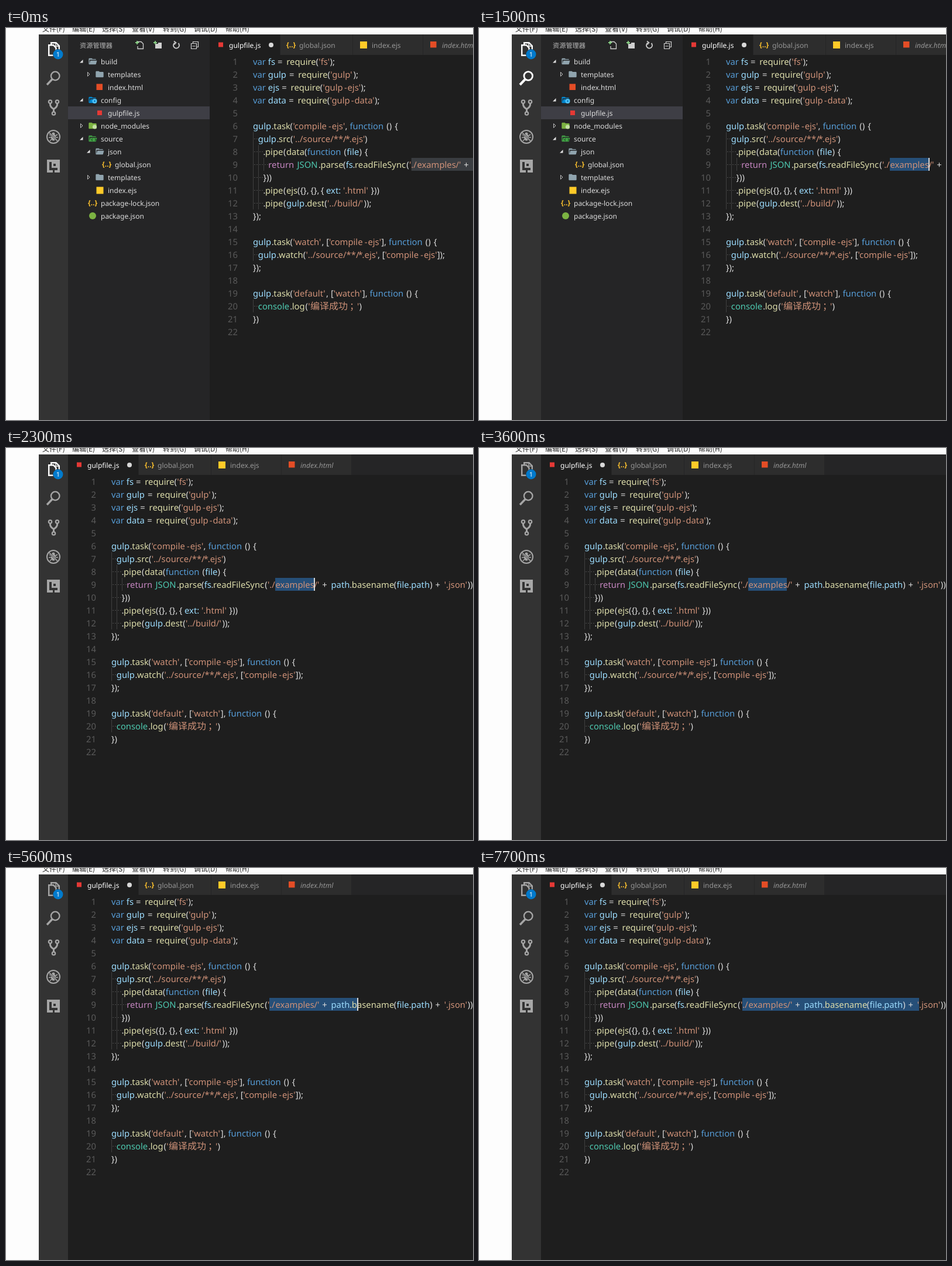
An HTML page with a canvas that plays this animation: 798 by 670 pixels, repeating every 8000 ms.

```html
<!DOCTYPE html>
<html lang="en">
<head>
<meta charset="utf-8">
<title>Editor</title>
<style>
html, body { margin: 0; width: 100%; height: 100%; overflow: hidden; background: #1e1e1e; }
canvas { display: block; }
</style>
</head>
<body>
<canvas id="stage" width="798" height="670"></canvas>
<script>
const ctx = document.getElementById('stage').getContext('2d');
const LOOP = 8000;
const ROW = 22, TOP = 46;
const LATIN = '"Noto Sans", "Open Sans", sans-serif';
const CJK = '"Noto Sans CJK SC", "Noto Sans CJK", sans-serif';
const CODE_FONT = '14.8px ' + LATIN;
const UI_FONT = '12px ' + LATIN;

const SYNTAX = {
  k: '#569cd6', v: '#9cdcfe', f: '#dcdcaa', p: '#dcdcdc',
  s: '#ce9178', c: '#c586c0', t: '#4ec9b0', z: '#ce9178'
};

// Each token is kind:offset:text, the offset counted from the code's left edge.
const CODE = [
  "k:0:var v:25.8:fs p:42:= f:57.3:require p:107.5:( s:112.3:'fs' p:131.5:);",
  "k:0:var v:25.8:gulp p:62:= f:77.3:require p:127.5:( s:132.3:'gulp' p:171.5:);",
  "k:0:var v:25.8:ejs p:49.3:= f:64.6:require p:114.8:( s:119.6:'gulp s:155.9:- s:161.5:ejs' p:184.3:);",
  "k:0:var v:25.8:data p:61.2:= f:76.5:require p:126.7:( s:131.5:'gulp s:167.8:- s:173.4:data' p:208.1:);",
  "",
  "v:0:gulp p:31.8:. f:35.3:task p:63.6:( s:68.4:'compile s:129.1:- s:134.7:ejs' p:157.5:, k:165.4:function p:228.2:() p:242.2:{",
  "v:8.8:gulp p:40.6:. f:44.1:src p:63.9:( s:68.7:'../ s:85.6:source s:132.3:/**/ s:157.8:* s:164.8:.ejs' p:191.1:)",
  "p:17.5:. f:21:pipe p:52.1:( f:56.9:data p:87.9:( k:92.7:function p:155.5:( v:160.3:file p:181.5:) p:190.7:{",
  "c:26.3:return t:75.5:JSON p:112.1:. f:115.6:parse p:153.9:( v:158.7:fs p:170.5:. f:174:readFileSync p:262.2:( s:267:'./ s:280.4:examples s:346.4:/' p:360.3:+ v:375.5:path p:407.3:. f:410.8:basename p:482.8:( v:487.6:file p:508.7:. v:512.2:path p:544.2:) p:553.4:+ s:568.7:'.json' p:608.8:))",
  "p:17.5:}))",
  "p:17.5:. f:21:pipe p:52.1:( f:56.9:ejs p:76:({}, p:98.3:{}, p:115.8:{ v:125:ext: s:154:'.html' p:201.5:}))",
  "p:17.5:. f:21:pipe p:52.1:( v:56.9:gulp p:88.7:. f:92.2:dest p:122.2:( s:127:'../ s:143.9:build/' p:189.5:));",
  "p:0:});",
  "",
  "v:0:gulp p:31.8:. f:35.3:task p:63.6:( s:68.4:'watch' p:117.4:, p:125.3:[ s:130.1:'compile s:190.8:- s:196.4:ejs' p:219.2:], k:231.9:function p:294.7:() p:308.7:{",
  "v:8.8:gulp p:40.6:. f:44.1:watch p:85.7:( s:90.5:'../ s:107.4:source s:154.1:/**/ s:179.6:* s:186.6:.ejs' p:212.9:, p:220.8:[ s:225.6:'compile s:286.3:- s:291.9:ejs' p:314.7:]);",
  "p:0:});",
  "",
  "v:0:gulp p:31.8:. f:35.3:task p:63.6:( s:68.4:'default' p:125.1:, p:133:[ s:137.8:'watch' p:186.8:], k:199.5:function p:262.3:() p:276.3:{",
  "t:8.8:console p:63.2:. f:66.7:log p:89.4:( s:94.2:' z:97.9:编译成功 z:165:； s:177.9:' p:181.6:)",
  "p:0:})",
  ""
].map(line => line.split(' ').filter(Boolean).map(token => {
  const [, kind, x, text] = token.match(/^(\w):([\d.]+):(.*)$/);
  return { kind, x: +x, text };
}));

// Label, icon, icon x, disclosure arrow (1 open, 0 closed).
const TREE = [
  ['build', 'open', 140, 1],
  ['templates', 'folder', 152, 0],
  ['index.html', 'html', 152],
  ['config', 'config', 140, 1],
  ['gulpfile.js', 'task', 152],
  ['node_modules', 'modules', 140, 0],
  ['source', 'source', 140, 1],
  ['json', 'open', 152, 1],
  ['global.json', 'json', 164],
  ['templates', 'folder', 152, 0],
  ['index.ejs', 'script', 152],
  ['package-lock.json', 'json', 140],
  ['package.json', 'node', 140]
];

const FOLDER = new Path2D('M10 4H4c-1.1 0-2 .9-2 2v12c0 1.1.9 2 2 2h16c1.1 0 2-.9 2-2V8c0-1.1-.9-2-2-2h-8l-2-2z');
const FOLDER_OPEN = new Path2D('M19 20H4a2 2 0 0 1-2-2V6c0-1.1.9-2 2-2h6l2 2h7a2 2 0 0 1 2 2H4v10l2.1-8h17.1l-2.3 8.5c-.2.9-1 1.5-1.9 1.5z');

// Line 9 over time: [ms, selection start, selection end, caret], null for none.
const EDITS = [
  [0, 270.7, 700, null], [500, 0, 0, 346], [600, 280, 346, 346], [1000, 280, 346, null],
  [1500, 280, 346, 346], [1900, 280, 346, null], [2300, 280, 346, 346], [2700, 280, 346, null],
  [3100, 280, 346, 346], [3600, 280, 346, null], [4000, 0, 0, 280], [4500, 0, 0, null],
  [4900, 0, 0, 280], [5200, 0, 0, 270], [5300, 270, 280, 280],
  ...[[5400, 371], [5600, 420], [5700, 444], [5800, 461], [5900, 483], [6000, 508], [6100, 528],
    [6200, 553], [6600, 564], [6700, 572], [6800, 580], [7100, 576], [7200, 572]
  ].map(([ms, x]) => [ms, 270, x, x]),
  [7700, 270, 572, null]
];

function rect(x, y, w, h, color) {
  ctx.fillStyle = color;
  ctx.fillRect(x, y, w, h);
}

function disc(x, y, r, color) {
  ctx.fillStyle = color;
  ctx.beginPath();
  ctx.arc(x, y, r, 0, Math.PI * 2);
  ctx.fill();
}

function text(str, x, y, color, font, align = 'left') {
  ctx.font = font;
  ctx.fillStyle = color;
  ctx.textAlign = align;
  ctx.fillText(str, x, y);
}

function stroke(path, color, width) {
  ctx.strokeStyle = color;
  ctx.lineWidth = width;
  ctx.stroke(new Path2D(path));
}

function fillIcon(path, x, y, color) {
  ctx.save();
  ctx.translate(x, y);
  ctx.scale(2 / 3, 2 / 3);
  ctx.fillStyle = color;
  ctx.fill(path);
  ctx.restore();
}

// x is the left edge of a 16 px cell, y its middle.
const ICONS = {
  open: (x, y) => fillIcon(FOLDER_OPEN, x, y - 8, '#90a4ae'),
  folder: (x, y) => fillIcon(FOLDER, x, y - 8, '#90a4ae'),
  config(x, y) {
    fillIcon(FOLDER_OPEN, x, y - 8, '#0288d1');
    disc(x + 11.5, y + 2, 4, '#4fc3f7');
    disc(x + 11.5, y + 2, 1.4, '#0277bd');
  },
  modules(x, y) {
    fillIcon(FOLDER, x, y - 8, '#7cb342');
    disc(x + 11.5, y + 2, 3.6, '#c5e1a5');
  },
  source(x, y) {
    fillIcon(FOLDER_OPEN, x, y - 8, '#43a047');
    stroke(`M${x + 8} ${y}l-2 2 2 2M${x + 12} ${y}l2 2-2 2`, '#1b5e20', 1.2);
  },
  json: (x, y) => text('{..}', x, y + 4, '#fbc02d', '600 12px ' + LATIN),
  html: (x, y) => rect(x + 2.5, y - 5.5, 10.5, 10.5, '#e44d26'),
  script: (x, y) => rect(x + 2.5, y - 5.5, 12, 12, '#ffca28'),
  task: (x, y) => rect(x + 4, y - 4, 8, 8, '#e53935'),
  node: (x, y) => disc(x + 8, y, 6, '#7cb342')
};

function drawMenu() {
  rect(0, 0, 798, 11, '#fbfbfb');
  rect(0, 0, 56, 670, '#fdfdfd');
  const items = ['文件(F)', '编辑(E)', '选择(S)', '查看(V)', '转到(G)', '调试(D)', '帮助(H)'];
  const xs = [62, 113, 164, 215, 268, 321, 375];
  items.forEach((item, i) => text(item, xs[i], 6, '#222', '12px ' + CJK));
}

function drawActivityBar(t) {
  const dim = '#a6a6a6';
  rect(56, 11, 50, 659, '#333333');

  const files = t < 2500 ? '#ffffff' : dim;
  stroke('M77.2 28V25.2H85.5L90.8 30.5V42H86', files, 2.4);
  stroke('M85 25V31H91', files, 1.4);
  stroke('M73.2 29.2H81L85.5 34V46.8H73.2Z', files, 2.4);
  disc(89, 45, 9, '#333333');
  disc(89, 45, 8.5, '#007acc');
  text('1', 89, 49, '#fff', '11px ' + LATIN, 'center');

  const hot = t >= 1500 && t < 1600;
  const search = hot ? '#ffffff' : dim;
  stroke('M91.5 82a7.3 7.3 0 1 1-14.6 0a7.3 7.3 0 1 1 14.6 0', search, hot ? 2.8 : 2.3);
  stroke('M79 87.5L70 97', search, hot ? 4 : 3.4);

  stroke('M75.5 129V131Q75.5 135 81.5 138.5V144M87.5 129V131Q87.5 135 81.5 138.5', dim, 3);
  for (const [x, y] of [[75.5, 126], [87.5, 126], [81.5, 146]]) {
    disc(x, y, 3.8, dim);
    disc(x, y, 1.6, '#333333');
  }

  stroke('M92 186a11 11 0 1 1-22 0a11 11 0 1 1 22 0', dim, 2);
  ctx.fillStyle = dim;
  ctx.beginPath();
  ctx.ellipse(81, 187, 4, 5.8, 0, 0, Math.PI * 2);
  ctx.fill();
  disc(81, 181, 2.6, dim);
  stroke('M74 182L78 184.5M88 182L84 184.5M73 187H89M75 193L78 190M87 193L84 190', dim, 1.5);
  stroke('M74 179L88 193', '#333333', 3);
  stroke('M73.5 178.5L88.5 193.5', dim, 1.7);

  rect(70, 225, 22, 22, dim);
  rect(74, 229, 14, 14, '#333333');
  rect(78, 229, 10, 10, dim);
  rect(81, 232, 4, 4, '#333333');
  rect(80, 243, 3, 4, '#333333');
}

function drawTwisty(x, y, open) {
  if (open) {
    ctx.fillStyle = '#e0e0e0';
    ctx.fill(new Path2D(`M${x - 3} ${y + 2.5}h5.5v-5.5z`));
  } else {
    stroke(`M${x - 1.5} ${y - 3.5}L${x + 2} ${y}L${x - 1.5} ${y + 3.5}Z`, '#c0c0c0', 1);
  }
}

function drawSidebar(t) {
  const ink = '#d0d0d0';
  rect(106, 11, 242, 659, '#252526');
  text('资源管理器', 126, 34, '#bbbbbb', '11.2px ' + CJK);

  stroke('M225 26V23.5H231L234.5 27V35.5H225V31', ink, 1.3);
  stroke('M221 25H227M224 22V28', '#89d185', 1.8);
  rect(255, 27, 11, 8, ink);
  rect(260, 25, 6, 3, ink);
  stroke('M252 25H258M255 22V28', '#89d185', 1.8);
  stroke('M294.5 26A5 5 0 1 1 288.5 25.3', ink, 1.8);
  stroke('M287 22.5L290.5 25.2L287.5 28.5', ink, 1.6);
  stroke('M319.5 26V23.5H328.5V32.5H326', ink, 1.2);
  stroke('M316.5 26.5H325.5V35.5H316.5ZM318.5 31H323.5', ink, 1.2);

  if (t >= 1200 && t < 1500) rect(106, 178, 242, ROW, '#2f3133');
  rect(106, 134, 242, ROW, '#3e3e45');
  TREE.forEach(([label, icon, x, open], i) => {
    const y = TOP + i * ROW + 11;
    if (open !== undefined) drawTwisty(x - 11, y, open);
    ICONS[icon](x, y);
    text(label, x + 22, y + 5, '#dcdcdc', UI_FONT);
  });
}

function drawTabs(left) {
  rect(left, 11, 798 - left, 35, '#252526');
  const tabs = [
    ['gulpfile.js', 'task', 0, 120, 11, 33],
    ['global.json', 'json', 121, 123, 131, 153],
    ['index.ejs', 'script', 245, 119, 254.5, 277],
    ['index.html', 'html', 365, 119, 374.5, 397]
  ];
  tabs.forEach(([label, icon, x, w, iconX, textX], i) => {
    rect(left + x, 11, w, 35, i ? '#2d2d2d' : '#1e1e1e');
    ICONS[icon](left + iconX, 28.5);
    const font = (i === 3 ? 'italic ' : '') + UI_FONT;
    text(label, left + textX, 34, i ? '#969696' : '#ffffff', font);
  });
  disc(left + 105, 29, 4, '#d8d8d8');
}

function drawIndent(x, y, depth) {
  for (let i = 0; i < depth; i++) {
    const gx = Math.round(x + i * 8.8);
    rect(gx, y, 1, ROW, '#404040');
    rect(gx + 2, y + 11, 2, 1, '#4c4c4c');
    rect(gx + 6, y + 11, 2, 1, '#4c4c4c');
  }
}

function drawLineNine(base, t, start, end) {
  const y = TOP + 8 * ROW;
  if (end > start) {
    const unfocused = t < 500 || (t >= 2100 && t < 2300);
    rect(base + start, y, end - start, ROW, unfocused ? '#3a3d41' : '#264f78');
  } else {
    rect(base - 16, y, 798, 1, '#2b2b2b');
    rect(base - 16, y + ROW - 1, 798, 1, '#2b2b2b');
  }
  // Other places where the short selection "./" occurs.
  if (t >= 5300 && t < 5400) {
    for (const [line, x] of [[7, 75.9], [12, 134.2], [16, 97.7]]) {
      rect(base + x, TOP + (line - 1) * ROW, 9.7, ROW, '#343a41');
    }
  }
}

function drawEditor(left, t) {
  rect(left, 11, 798 - left, 659, '#1e1e1e');
  drawTabs(left);
  const base = left + 74;
  const [, start, end, caret] = EDITS.findLast(edit => edit[0] <= t);
  drawLineNine(base, t, start, end);
  CODE.forEach((tokens, i) => {
    const y = TOP + i * ROW;
    text(i + 1, left + 48, y + 17, '#5a5a5a', CODE_FONT, 'right');
    if (tokens.length) drawIndent(base, y, Math.round(tokens[0].x / 8.8));
    for (const { kind, x, text: str } of tokens) {
      text(str, base + x, y + 17, SYNTAX[kind], kind === 'z' ? '16px ' + CJK : CODE_FONT);
    }
  });
  if (caret !== null) rect(base + caret, TOP + 8 * ROW, 2, ROW, '#d8d8d8');
}

function draw() {
  const t = performance.now() % LOOP;
  const sidebar = t < 2300;
  ctx.textRendering = 'geometricPrecision';
  drawEditor(sidebar ? 348 : 106, t);
  if (sidebar) drawSidebar(t);
  drawActivityBar(t);
  drawMenu();
  requestAnimationFrame(draw);
}

requestAnimationFrame(draw);
</script>
</body>
</html>
```
